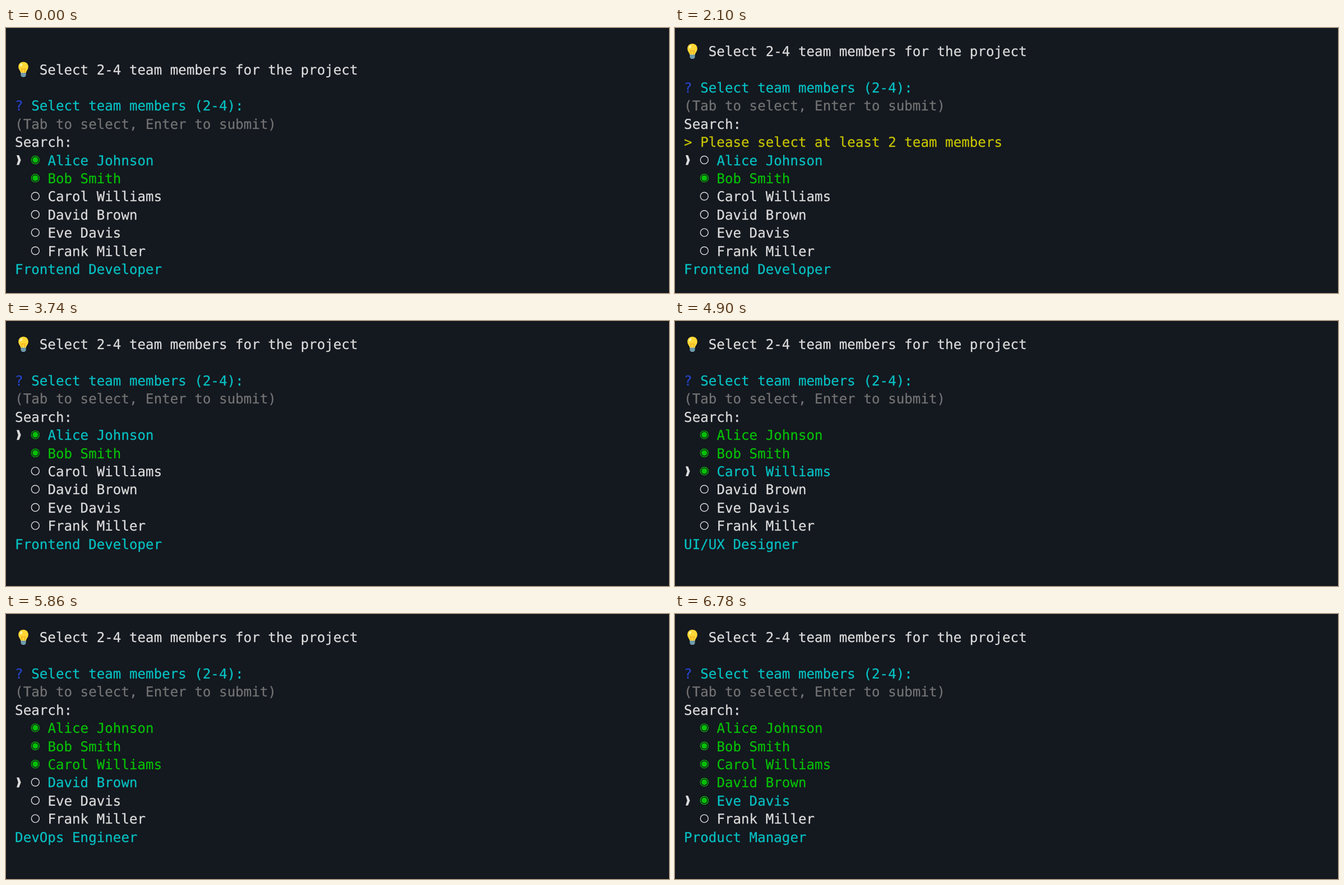
An HTML page for the animation above (8 s loop, 1183 px wide and 473 px high).

```html
<!DOCTYPE html>
<html lang="en">
<head>
<meta charset="utf-8">
<title>Team picker</title>
<style>
  html, body { margin: 0; width: 100%; height: 100%; overflow: hidden; background: #14181f; }
  svg { display: block; }
  text {
    font: 24.2px "DejaVu Sans Mono", monospace;
    white-space: pre;
    text-rendering: geometricPrecision;
    stroke-width: 0.25px;
  }
</style>
</head>
<body>
<svg id="screen" width="1183" height="473"></svg>
<script>
const LOOP = 8000, LEFT = 16.1, COL = 14.57, FIRST_ROW = 41.6, ROW = 32.4;
const WHITE = '#dcdcdc', CYAN = '#06c1c3', GREEN = '#06c006',
      YELLOW = '#c7c400', BLUE = '#2744c7', GRAY = '#737373';

const members = [
  ['Alice Johnson', 'Frontend Developer'],
  ['Bob Smith', 'Backend Developer'],
  ['Carol Williams', 'UI/UX Designer'],
  ['David Brown', 'DevOps Engineer'],
  ['Eve Davis', 'Product Manager'],
  ['Frank Miller', 'QA Engineer']
];

// start time, cursor row, selected members, first text row, warning shown
const states = [
  [0, 0, [0, 1], 1, false],
  [500, 0, [1], 1, false],
  [2100, 0, [1], 0, true],
  [3740, 0, [0, 1], 0, false],
  [4660, 1, [0, 1], 0, false],
  [4780, 2, [0, 1], 0, false],
  [4900, 2, [0, 1, 2], 0, false],
  [5860, 3, [0, 1, 2], 0, false],
  [5980, 3, [0, 1, 2, 3], 0, false],
  [6740, 4, [0, 1, 2, 3], 0, false],
  [6780, 4, [0, 1, 2, 3, 4], 0, false]
];

const middle = row => FIRST_ROW + row * ROW;

const text = (col, row, color, string) =>
  `<text x="${LEFT + col * COL}" y="${middle(row) + 8.6}" fill="${color}" stroke="${color}">${string.replace('>', '&gt;')}</text>`;

const radio = (row, on) => {
  const at = `cx="52.3" cy="${middle(row) - 0.5}"`;
  return on
    ? `<circle ${at} r="7.1" fill="none" stroke="${GREEN}" stroke-width="1.2"/><circle ${at} r="5" fill="${GREEN}"/>`
    : `<circle ${at} r="7" fill="none" stroke="${WHITE}" stroke-width="1.4"/>`;
};

const pointer = row =>
  `<path transform="translate(19 ${middle(row) - 9})" fill="${WHITE}" d="M0 0H4.2L7.6 8.8L4.2 17.6H0L2.8 8.8Z"/>`;

const bulb = row => `<g transform="translate(31 ${middle(row)})">
  <path fill="#fdd835" d="M0-13.6C-5.6-13.6-8.8-9.6-8.8-4.7C-8.8 0-5.3 2.2-4.5 6.5H4.5C5.3 2.2 8.8 0 8.8-4.7C8.8-9.6 5.6-13.6 0-13.6Z"/>
  <path fill="none" stroke="#f39c1f" d="M-2 6L-3.3-1.5L-1.2 0L0-1.5L1.2 0L3.3-1.5L2 6"/>
  <ellipse cx="-4" cy="-8" rx="1.8" ry="3" fill="#fff3a8" transform="rotate(30 -4 -8)"/>
  <path fill="#82aec0" d="M-4.5 6H4.5V10.5Q4 13.3 0 13.5Q-4 13.3-4.5 10.5Z"/>
  <path stroke="#48788a" d="M-4.5 8.3L4.5 7.5M-4.3 11L4.3 10.2"/></g>`;

function draw([, cursor, selected, top, warning]) {
  let row = top;
  let out = bulb(row) + text(3, row, WHITE, 'Select 2-4 team members for the project');
  row += 2;
  out += text(0, row, BLUE, '?') + text(2, row++, CYAN, 'Select team members (2-4):');
  out += text(0, row++, GRAY, '(Tab to select, Enter to submit)');
  out += text(0, row++, WHITE, 'Search:');
  if (warning) out += text(0, row++, YELLOW, '> Please select at least 2 team members');
  members.forEach(([name], i) => {
    const on = selected.includes(i);
    if (i === cursor) out += pointer(row);
    out += radio(row, on) + text(4, row++, i === cursor ? CYAN : on ? GREEN : WHITE, name);
  });
  return out + text(0, row, CYAN, members[cursor][1]);
}

const screen = document.getElementById('screen');
let shown;
function tick() {
  const time = performance.now() % LOOP;
  const state = states.findLast(([start]) => start <= time);
  if (state !== shown) screen.innerHTML = draw(shown = state);
  requestAnimationFrame(tick);
}
tick();
</script>
</body>
</html>
```
